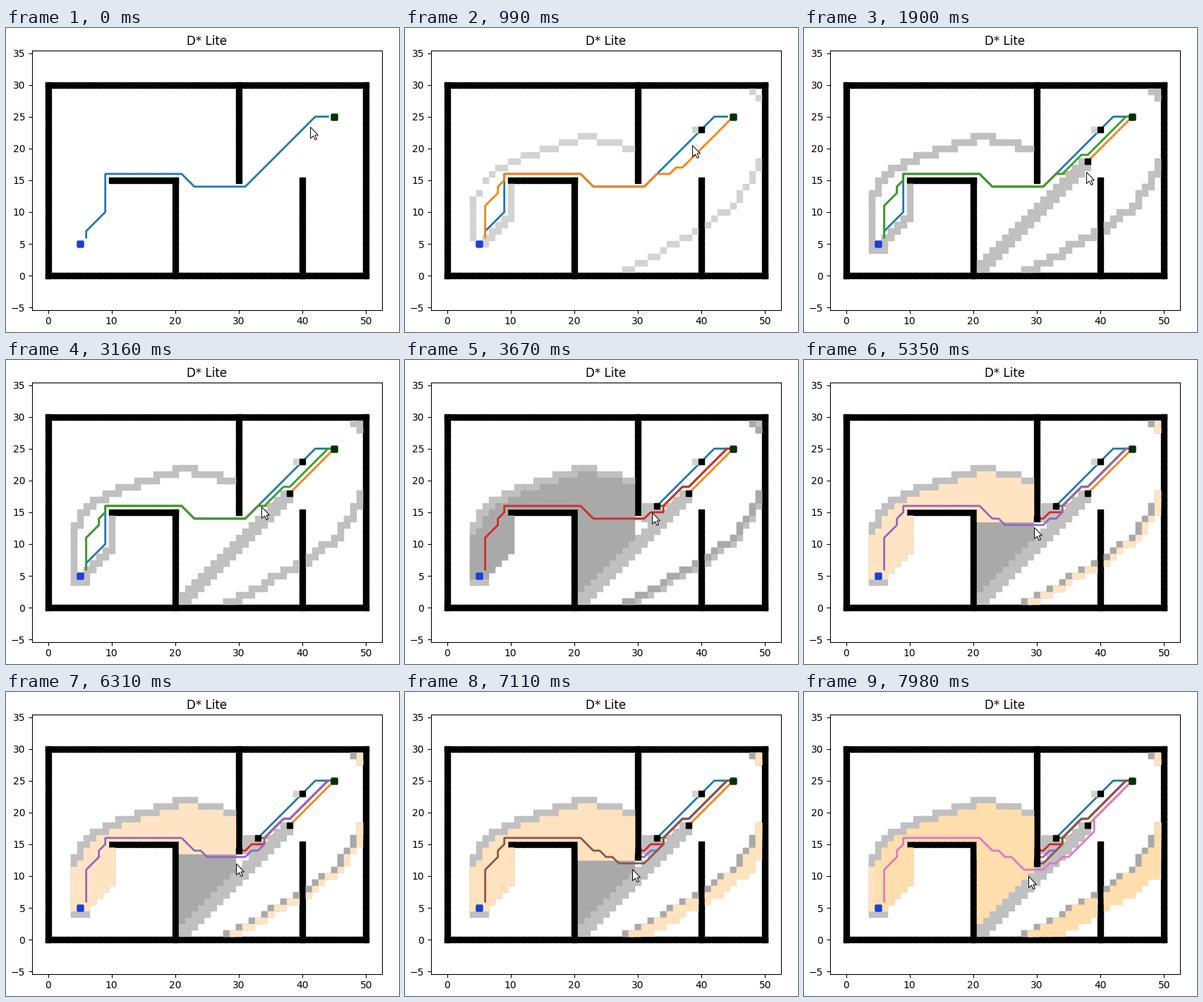
Recreate the animation shown at these times as a matplotlib script. Size 557 by 431 pixels, loop 8 s.

```python
import numpy as np
import matplotlib.pyplot as plt
from matplotlib.animation import FuncAnimation
from matplotlib.patches import Polygon
from matplotlib.transforms import IdentityTransform

W, H, DPI = 557, 431, 100
LOOP, STEP = 8000, 20

# Default axes box of a 640 x 477 window, seen through the stage
LEFT, TOP = 0.125 * 640 - 43, 0.12 * 477 - 25
WIDTH, HEIGHT = 0.775 * 640, 0.77 * 477
HALF_X = 27.5
HALF_Y = HALF_X * HEIGHT / WIDTH

fig = plt.figure(figsize=((W + 1e-4) / DPI, (H + 1e-4) / DPI), dpi=DPI)
ax = fig.add_axes([LEFT / W, 1 - (TOP + HEIGHT) / H, WIDTH / W, HEIGHT / H])
ax.set_xlim(25 - HALF_X, 25 + HALF_X)
ax.set_ylim(15 - HALF_Y, 15 + HALF_Y)
ax.set_title("D* Lite")


def squares(cells, color, z):
    return ax.plot(*zip(*cells), "s", color=color, zorder=z)[0]


def route(points, color, z):
    return ax.plot(*zip(*points), color=color, lw=2, zorder=z)[0]


def block(x0, x1, y0, y1):
    return [(x, y) for x in range(x0, x1 + 1) for y in range(y0, y1 + 1)]


def sky(x):
    """Upper rim of the searched area."""
    return round(np.interp(x, [4, 7, 10, 18, 22, 29], [12, 16, 18, 20.6, 22, 20]))


def front(y):
    """Left edge of the lower right search front."""
    return round(np.interp(y, [1, 8, 12, 18], [28, 41, 45.8, 49.4]))


def rim(grow):
    out = block(4, 4, 6 - 2 * grow, 12) + block(10, 10, 9, 14)
    out += block(4, 3 + 3 * grow, 4, 4)
    for x in range(6, 10):
        out += block(x, x, x - 1, max(5, x))
    for x in range(4, 30):
        out += block(x, x, *sorted((sky(x), sky(x + grow))))
    return out


def strip(a, b):
    out = []
    for y in range(1, 19):
        lo = min(front(y) + a, 49)
        hi = min(max(lo, front(y + 1) + b), 49)
        out += [c for c in block(lo, hi, y, y) if c[0] != 40]
    return out


def region(low, first=4):
    """Inside of the rim; right of the inner wall only down to row low."""
    out = []
    for x in range(first, 30):
        base = max(5, x - 1) if x <= 10 else 16 if x <= 20 else max(low, x - 18)
        out += [c for c in block(x, x, base, sky(x) - 1) if x < 10 or c[1] != 15 or x > 20]
    return out


band = [(x, r) for r in range(1, 18) for x in range(max(21, r + 19), r + 22)]
corner = [(48, 29), (49, 28)]
edge = block(49, 49, 28, 29)

tail = [(21, 16), (9, 16), (9, 15), (8, 14), (8, 13), (6, 11), (6, 6)]
head = [(45, 25), (44, 25), (38, 19), (37, 19), (34, 16)]
middle = [(31, 14), (23, 14)] + tail


def under(row):
    """Way through the gap on the given row, then up to the old path."""
    return [(31, row), (39 - row, row), (26, 13), (25, 13), (24, 14), (23, 14)] + tail


# time, obstacle, painted cells, line colour, path
stages = [
    (700, (40, 23), [("lightgray", rim(0) + strip(0, -1) + corner + [(39, 23)])],
     "tab:orange", [(45, 25), (37, 17), (36, 17), (35, 16), (33, 16)] + middle),
    (1750, (38, 18), [("silver", rim(1) + strip(0, 0) + corner + edge + band + [(37, 18)])],
     "tab:green", head + [(33, 16)] + middle),
    (3450, (33, 16),
     [("silver", block(31, 33, 14, 16)), ("darkgray", region(3) + strip(0, -1) + corner)],
     "tab:red", head + [(34, 15), (32, 15)] + middle),
    (4900, (30, 14), [("bisque", region(14) + strip(1, 0) + edge)],
     "tab:purple", head + [(34, 15), (33, 14), (32, 14)] + under(13)),
    (6800, (30, 13), [("#ffe2be", region(13) + strip(1, 2) + edge)],
     "tab:brown", head + [(34, 15)] + under(12)),
    (7600, (30, 12), [("navajowhite", region(3, 5) + strip(1, 4))],
     "tab:pink",
     [(45, 25), (39, 19), (39, 17), (35, 13), (34, 13), (33, 12), (32, 12)] + under(11)),
]

walls = (block(0, 50, 0, 0) + block(0, 50, 30, 30) + block(0, 0, 0, 30)
         + block(50, 50, 0, 30) + block(10, 20, 15, 15) + block(20, 20, 0, 15)
         + block(40, 40, 0, 15) + block(30, 30, 15, 30))
squares(walls, "black", 3)
squares([(45, 25)] * 6, "#003300", 90)
squares([(5, 5)] * 6, "#1a40d8", 90)
route([(44, 25), (42, 25), (31, 14), (23, 14), (21, 16), (9, 16), (9, 10), (6, 7), (6, 6)],
      "tab:blue", 4)

layers = []
for n, (start, spot, fills, color, path) in enumerate(stages, 1):
    parts = [squares(c, fill, 10 * n + k) for k, (fill, c) in enumerate(fills)]
    parts += [squares([spot], "black", 10 * n + 5), route(path, color, 10 * n + 6)]
    layers.append((start, parts))

# Pointer moves: start, end, x, y of the tip; it rests in between
HOME = np.array([432, 141])
moves = [
    (50, 280, 426, 139), (480, 990, 408, 167), (1000, 1400, 409, 183),
    (1580, 1900, 401, 205), (2130, 2260, 371, 211), (2460, 2600, 363, 206),
    (2930, 3160, 363, 209), (3200, 3960, 344, 222), (4140, 4550, 338, 225),
    (4830, 4980, 333, 234), (5120, 5350, 327, 238), (5580, 6310, 327, 244),
    (6410, 7980, 319, 262),
]
ARROW = np.array([(0, 0), (0, 16), (4, 12.5), (6.5, 18), (9, 17), (6.5, 11.5), (11, 11.5)])
pointer = Polygon(ARROW, closed=True, fc="white", ec="black", lw=0.7, zorder=100)
fig.add_artist(pointer)
pointer.set_transform(IdentityTransform())


def tip(t):
    pos = HOME
    for start, end, x, y in moves:
        pos = pos + (np.array([x, y]) - pos) * np.clip((t - start) / (end - start), 0, 1)
    return np.round(pos) - 0.5


def update(i):
    t = i * STEP + STEP / 2
    for start, parts in layers:
        for p in parts:
            p.set_visible(t >= start)
    pointer.set_xy((ARROW + tip(t)) * [1, -1] + [0, H])
    return []


anim = FuncAnimation(fig, update, frames=LOOP // STEP, interval=STEP,
                     init_func=lambda: update(0), repeat=True, repeat_delay=0, blit=False)
plt.show()
```
